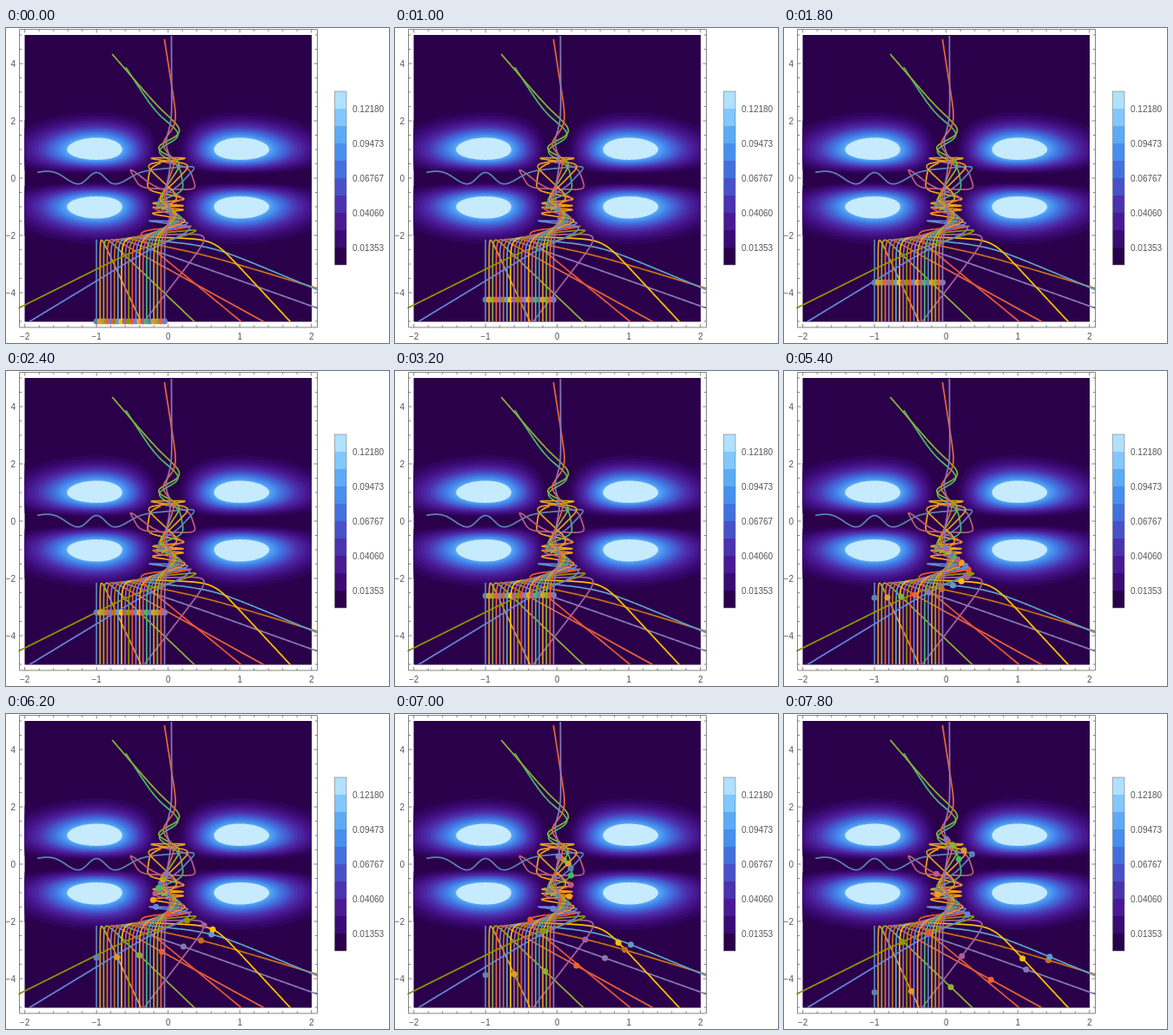
These frames come from a looping animation (441 px wide and 363 px high, 8000 ms). An HTML page:

```html
<!DOCTYPE html>
<html lang="en">
<head>
<meta charset="utf-8">
<title>Scattering in a four-peak potential</title>
<style>
  html, body { margin: 0; width: 100%; height: 100%; overflow: hidden; background: #fff; }
  svg { display: block; width: 441px; height: 363px; }
  text { font: 10px "Liberation Sans", Arial, sans-serif; fill: #555; }
</style>
</head>
<body>
<svg id="stage" viewBox="0 0 441 363" xmlns="http://www.w3.org/2000/svg">
  <defs>
    <clipPath id="plot"><rect x="21.5" y="8" width="330.5" height="330.5"/></clipPath>
    <clipPath id="wide"><rect x="14.5" y="8" width="344" height="330.5"/></clipPath>
  </defs>
</svg>
<script>
const svg = document.getElementById('stage');
const STEP = 200, LOOP = 8000;
const K = 2, SPEED = 0.25, T_END = 40, T_STEP = 0.604;
const H = 0.01, SAVE = 10;
const PEAK = Math.exp(-2), LEVEL = 0.005, CLIP = 0.1;
const BANDS = ['#2a004b', '#3b0a75', '#491a94', '#4b32ae', '#4852c8',
               '#4270de', '#478fee', '#5cabf6', '#82c7ff', '#b0e1ff'];
const TOP = '#c6ebff';
const COLORS = ['#5e81b5', '#e19c24', '#8fb032', '#eb6235', '#8778b3', '#c56e1a', '#5d9ec7', '#ffbf00',
                '#a5609d', '#929600', '#e95536', '#6685d9', '#f89f13', '#bc5b80', '#47b66d'];

const px = x => 186.7 + 82.5 * x;
const py = y => 173 - 33 * y;
const fix = v => v.toFixed(2);

function add(tag, attrs, parent = svg) {
  const el = document.createElementNS('http://www.w3.org/2000/svg', tag);
  for (const k in attrs) el.setAttribute(k, attrs[k]);
  parent.appendChild(el);
  return el;
}
function label(str, x, y, anchor) {
  add('text', { x, y, 'text-anchor': anchor }).textContent = str;
}
const polyline = pts => 'M' + pts.map(([x, y]) => fix(px(x)) + ' ' + fix(py(y))).join('L');

// The field is x^2 y^2 exp(-x^2 - y^2); g is one factor scaled to peak 1.
const g = x => x * x * Math.exp(1 - x * x);

function root(c, lo, hi) {
  const rising = g(lo) < g(hi);
  for (let i = 0; i < 40; i++) {
    const m = (lo + hi) / 2;
    if ((g(m) < c) === rising) lo = m; else hi = m;
  }
  return lo;
}

function contour(c) {
  const a = root(c, 0, 1), b = root(c, 1, 5), lower = [], upper = [];
  for (let i = 0; i <= 80; i++) {
    const x = (a + b) / 2 - (b - a) / 2 * Math.cos(Math.PI * i / 80);
    const k = Math.min(1, c / g(x));
    lower.push([x, root(k, 0, 1)]);
    upper.unshift([x, root(k, 1, 5)]);
  }
  const ring = lower.concat(upper);
  return [[1, 1], [-1, 1], [1, -1], [-1, -1]]
    .map(([sx, sy]) => polyline(ring.map(([x, y]) => [sx * x, sy * y])) + 'Z').join('');
}

function shade(value) {
  const t = Math.max(0, value / PEAK * 10 - 0.5), i = Math.floor(t);
  const part = (hex, n) => parseInt(hex.substr(1 + 2 * n, 2), 16);
  const mix = n => Math.round(part(BANDS[i], n) + (part(BANDS[i + 1], n) - part(BANDS[i], n)) * (t - i));
  return `rgb(${mix(0)},${mix(1)},${mix(2)})`;
}

function drawField() {
  const field = add('g', { 'clip-path': 'url(#plot)' });
  add('rect', { x: 21, y: 8, width: 332, height: 331, fill: BANDS[0] }, field);
  const count = Math.round(CLIP / LEVEL);
  for (let i = 1; i <= count; i++) {
    const fill = i < count ? shade(LEVEL * (i + 0.5)) : TOP;
    add('path', { d: contour(LEVEL * i / PEAK), fill }, field);
  }
}

function drawAxes() {
  let d = 'M15.5 1.5H358.5V345H15.5Z';
  for (let i = -10; i <= 10; i++) {
    const x = fix(px(i / 5)), n = i % 5 ? 2.5 : 4;
    d += `M${x} 345v${-n}M${x} 1.5v${n}`;
    const y = fix(py(i / 2)), m = i % 4 ? 2.5 : 4;
    d += `M15.5 ${y}h${m}M358.5 ${y}h${-m}`;
  }
  add('path', { d, fill: 'none', stroke: '#666', 'stroke-width': 0.8 });
  const minus = n => String(n).replace('-', '−');
  for (let i = -2; i <= 2; i++) {
    label(minus(i), px(i), 358.5, 'middle');
    label(minus(2 * i), 11, py(2 * i) + 3.5, 'end');
  }
}

function drawLegend() {
  BANDS.forEach((fill, i) =>
    add('rect', { x: 378.5, y: 253 - 20 * i, width: 13.5, height: 20, fill }));
  add('rect', { x: 378.5, y: 73, width: 13.5, height: 200, fill: 'none', stroke: '#666', 'stroke-width': 0.5 });
  for (let i = 1; i < 10; i += 2)
    label((PEAK * i / 10).toFixed(5), 399, 276.5 - 20 * i, 'start');
}

function accel(x, y) {
  const v = -2 * K * x * y * Math.exp(-x * x - y * y);
  return [v * y * (1 - x * x), v * x * (1 - y * y)];
}
const slope = s => [s[2], s[3], ...accel(s[0], s[1])];
const move = (s, k, h) => s.map((v, i) => v + h * k[i]);

function trajectory(x0) {
  let s = [x0, -5, 0, SPEED];
  const pts = [[x0, -5]];
  for (let n = 1; n <= T_END / H; n++) {
    const a = slope(s), b = slope(move(s, a, H / 2));
    const c = slope(move(s, b, H / 2)), e = slope(move(s, c, H));
    s = s.map((v, i) => v + H / 6 * (a[i] + 2 * b[i] + 2 * c[i] + e[i]));
    if (n % SAVE === 0) pts.push([s[0], s[1]]);
  }
  return pts;
}

drawField();
const lines = add('g', { 'clip-path': 'url(#wide)', fill: 'none', 'stroke-width': 1.75, 'stroke-linejoin': 'round' });
const points = add('g', {});
const particles = Array.from({ length: 20 }, (_, i) => {
  const path = trajectory(-1 + i / 20), color = COLORS[i % COLORS.length];
  add('path', { d: polyline(path), stroke: color }, lines);
  return { path, dot: add('circle', { r: 3.5, fill: color }, points) };
});
drawAxes();
drawLegend();

function render(ms) {
  const t = Math.floor(ms % LOOP / STEP) * T_STEP / (H * SAVE);
  const i = Math.floor(t), f = t - i;
  for (const { path, dot } of particles) {
    const [x0, y0] = path[i], [x1, y1] = path[i + 1];
    dot.setAttribute('cx', fix(px(x0 + (x1 - x0) * f)));
    dot.setAttribute('cy', fix(py(y0 + (y1 - y0) * f)));
  }
}

const start = performance.now();
function tick(now) {
  render(Math.max(0, now - start));
  requestAnimationFrame(tick);
}
render(0);
requestAnimationFrame(tick);
</script>
</body>
</html>
```
